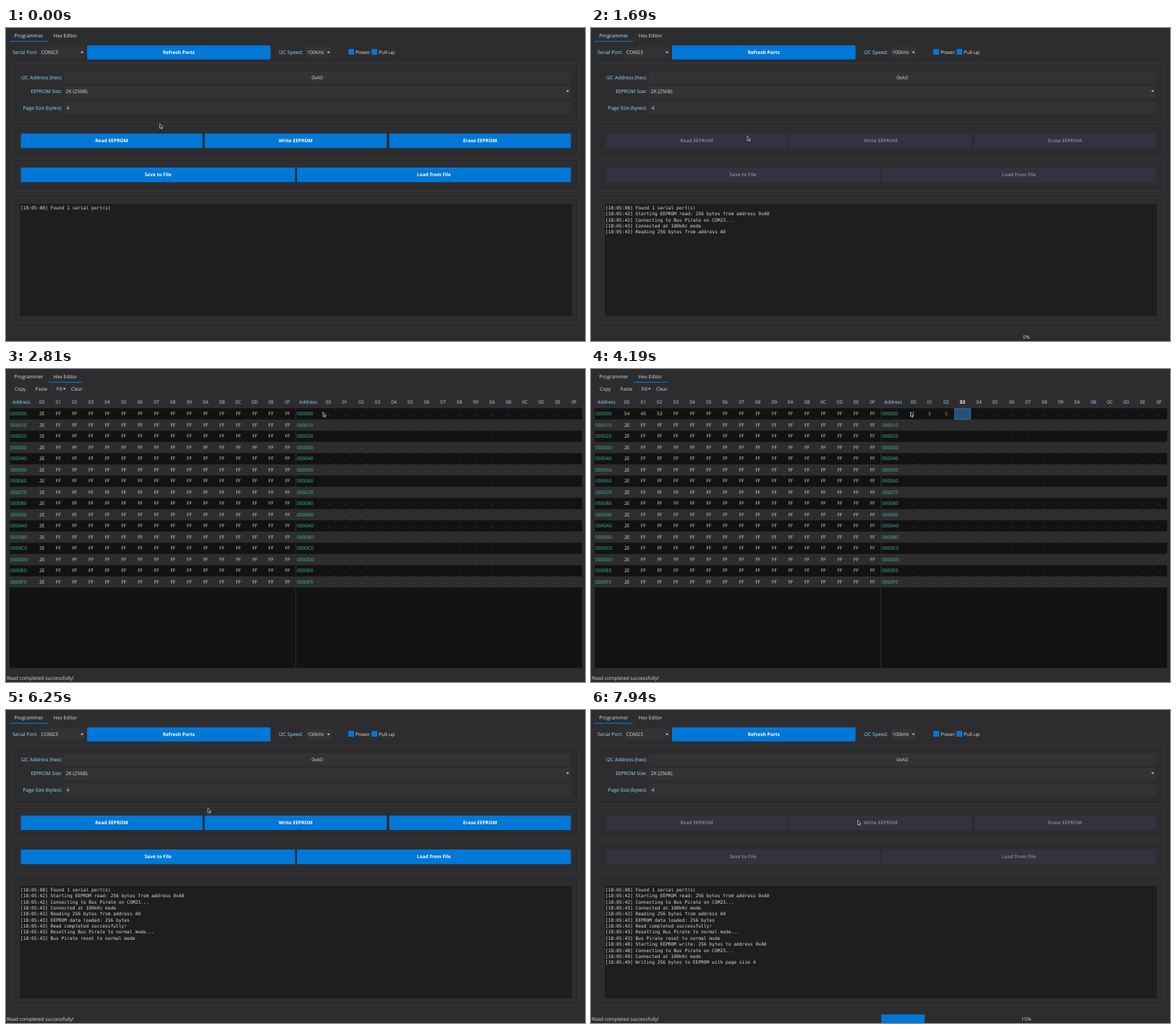
An HTML page that plays this animation: 800x433 px, repeating every 8000 ms.

```html
<!DOCTYPE html>
<html lang="en">
<head>
<meta charset="utf-8">
<title>EEPROM Programmer</title>
<style>
html, body { margin: 0; width: 100%; height: 100%; overflow: hidden; background: #2d2d30; }
svg { display: block; width: 800px; height: 433px; }
text { font: 6.8px "Open Sans", "Noto Sans", sans-serif; fill: #dcdcdc; text-rendering: geometricPrecision; white-space: pre; }
.mid { text-anchor: middle; }
.end { text-anchor: end; }
.label { fill: #9cdcfe; }
.btn text { font-size: 6.6px; font-weight: 700; fill: #fff; }
.btn rect { fill: #0078d7; }
.btn.hover rect { fill: #1080d9; }
.btn.off rect { fill: #323241; }
.btn.off text { fill: #808084; }
.log text { font: 6.27px "DejaVu Sans Mono", monospace; }
.hex text { font-size: 6.6px; }
.hex .label.on { fill: #fff; font-weight: 700; }
.hex .addr { fill: #42bd9c; }
.hex .byte { fill: #d8dcba; }
.hex .char { fill: #a29a96; }
.hex .char.edited { fill: #ce9178; }
</style>
</head>
<body>
<svg viewBox="0 0 800 433" id="stage"></svg>
<script>
const LOOP = 8000;
const T = {
  readClick: 780, connected: 1690, readDone: 1810, select: 2940,
  keys: [3810, 3970, 4130, 4380], recolor: 4880,
  tabHover: 5500, back: 5750, writeClick: 6840, writing: 7750
};
const WORD = 'TEST';

// time, x, y of the pointer tip
const POINTER = [
  [0, 212.5, 132.5], [60, 212.5, 132.5], [250, 214, 141], [480, 216, 149.5],
  [2310, 216, 149.5], [2440, 262, 132], [2600, 365, 92], [2740, 430, 63], [2810, 438, 59.5],
  [3130, 438, 59.5], [3380, 441.5, 59.5],
  [4880, 441.5, 59.5], [5030, 375, 53], [5300, 150, 24], [5480, 65, 11], [5600, 51.5, 8.5],
  [5740, 51.5, 8.5], [6000, 150, 62], [6250, 278.5, 135.5], [6480, 353, 150], [6600, 368.5, 152.5]
];

const LOG = [
  [0, '08', 'Found 1 serial port(s)'],
  [T.readClick, '42', 'Starting EEPROM read: 256 bytes from address 0xA0'],
  [T.readClick, '42', 'Connecting to Bus Pirate on COM23...'],
  [T.connected, '43', 'Connected at 100kHz mode'],
  [T.connected, '43', 'Reading 256 bytes from address A0'],
  [T.readDone, '43', 'EEPROM data loaded: 256 bytes'],
  [T.readDone, '43', 'Read completed successfully!'],
  [T.readDone, '43', 'Resetting Bus Pirate to normal mode...'],
  [T.readDone, '43', 'Bus Pirate reset to normal mode'],
  [T.writeClick, '48', 'Starting EEPROM write: 256 bytes to address 0xA0'],
  [T.writeClick, '48', 'Connecting to Bus Pirate on COM23...'],
  [T.writing, '49', 'Connected at 100kHz mode'],
  [T.writing, '49', 'Writing 256 bytes to EEPROM with page size 4']
];

const rect = (x, y, x2, y2, fill, more = '') =>
  `<rect x="${x}" y="${y}" width="${x2 - x}" height="${y2 - y}" fill="${fill}" ${more}/>`;
// y is the middle of the capitals
const text = (x, y, s, cls = '', more = '') =>
  `<text x="${x}" y="${y + 2.4}" class="${cls}" ${more}>${s}</text>`;
const frame = (y, y2) => rect(9.5, y + .5, 791.5, y2 + .5, 'none', 'stroke="#37373a" rx="2"');
const input = (x, y, x2, y2) => rect(x, y, x2, y2, '#333336', 'rx="1"');
const arrow = (x, y) => `<path d="M${x - 2} ${y - 1}h4l-2 2.2z" fill="#dcdcdc"/>`;
const button = (x, y, x2, y2, s, id = '') =>
  `<g class="btn" id="${id}">${rect(x, y, x2, y2, '', 'rx="1.5"')}${text((x + x2) / 2, y + 10, s, 'mid')}</g>`;
const hex = (n, len) => n.toString(16).toUpperCase().padStart(len, '0');

function programmerPage() {
  return frame(48, 130) + frame(134, 178) + frame(181, 225) + frame(229, 408) +
    text(9, 33.5, 'Serial Port:', 'label') + input(47, 26, 109, 41) +
    text(48.5, 33.5, 'COM23') + arrow(105, 33.8) +
    button(112, 24, 365.5, 43.5, 'Refresh Ports') +
    text(377, 33.5, 'I2C Speed:', 'label') + input(414, 26, 449, 41) +
    text(416, 33.5, '100kHz') + arrow(445.5, 33.8) +
    rect(473, 29, 481, 37, '#0078d7', 'rx="1"') + text(483, 33.5, 'Power') +
    rect(505, 29, 513, 37, '#0078d7', 'rx="1"') + text(515, 33.5, 'Pull-up') +
    text(77.5, 68.3, 'I2C Address (hex):', 'label end') + input(80, 60, 780.5, 77) +
    text(430, 68.3, '0xA0', 'mid') +
    text(77.5, 88, 'EEPROM Size:', 'label end') + input(80, 80, 780.5, 96) +
    text(82.5, 88, '2K (256B)') + arrow(776, 87.5) +
    text(77.5, 110.5, 'Page Size (bytes):', 'label end') + input(80, 102, 780.5, 119) +
    text(83.5, 110.5, '4') +
    button(20.5, 146, 271.5, 166, 'Read EEPROM', 'read') +
    button(274.5, 146, 526, 166, 'Write EEPROM', 'write') +
    button(529.5, 146, 780.5, 166, 'Erase EEPROM', 'erase') +
    button(20.5, 193, 399.5, 213.3, 'Save to File', 'save') +
    button(402, 193, 780.5, 213.3, 'Load from File', 'load') +
    rect(18.5, 242.5, 782.5, 399.5, '#1e1e1e', 'stroke="#38383b" stroke-width=".6"') +
    '<g class="log">' + LOG.map(([, sec, msg], i) =>
      text(20, 248.4 + i * 8.37, `[18:05:${sec}] ${msg}`, 'line')).join('') + '</g>';
}

function hexTable(left, first, side) {
  let s = rect(left, 38, left + 395, 413.5, '#121213') + rect(left, 38, left + 395, 54.3, '#2d2d30');
  for (let r = 1; r < 16; r += 2) s += rect(left, 54.3 + r * 15.5, left + 395, 69.8 + r * 15.5, '#2d2d30');
  if (side === 'char')
    s += '<rect id="sel" y="54.8" width="21.8" height="14.7" fill="#264f78" stroke="#3f7db5" stroke-width=".8"/>';
  s += text(left + 16.5, 45.3, 'Address', 'label mid');
  for (let c = 0; c < 16; c++)
    s += text(first + c * 22.62, 45.3, hex(c, 2), 'label mid', `id="${side}Head${c}"`);
  for (let r = 0; r < 16; r++) {
    const y = 62 + r * 15.5;
    s += text(left + 1, y, hex(r * 16, 6), 'addr');
    for (let c = 0; c < 16; c++) {
      const value = side === 'char' ? '.' : c ? 'FF' : '2E';
      s += text(first + c * 22.62, y, value, side + ' mid', `id="${side}${r * 16 + c}"`);
    }
  }
  return s;
}

function hexPage() {
  return text(12, 28, 'Copy') + text(40.5, 28, 'Paste') + text(69.5, 28, 'Fill') +
    arrow(80.8, 27.6) + text(90, 28, 'Clear') +
    hexTable(5, 49.6, 'byte') + hexTable(401, 445.5, 'char');
}

const $ = id => document.getElementById(id);
$('stage').innerHTML = rect(0, 0, 800, 433, '#2d2d30') +
  rect(5, 2, 58, 18, '#3b3b3e', 'id="tabHover"') +
  '<rect id="tabLine" y="17.8" height="1.1" fill="#0078d7"/>' +
  text(11.3, 10.3, 'Programmer') + text(65.5, 10.3, 'Hex Editor') +
  `<g id="progPage">${programmerPage()}</g><g id="hexPage" class="hex">${hexPage()}</g>` +
  text(1, 428, 'Read completed successfully!', '', 'id="status"') +
  '<g id="progress">' + rect(401, 421, 800, 433, '#2b2b2e', 'stroke="#353538" stroke-width=".6"') +
  rect(401, 421.3, 401, 433, '#0078d7', 'id="bar" rx="1"') + text(601.5, 428, '', 'mid', 'id="percent"') + '</g>' +
  '<path id="pointer" d="M0 0V6.4L1.5 5.1 2.6 7.4 3.6 6.9 2.6 4.7H4.5Z" fill="#1c1c1c" stroke="#d8d8d8" stroke-width=".7"/>';

const lines = document.querySelectorAll('.line');
const show = (el, on) => { el.style.display = on ? '' : 'none'; };

function pointerAt(t) {
  const i = POINTER.findIndex(p => p[0] > t);
  if (i < 0) return POINTER[POINTER.length - 1].slice(1);
  const [t0, x0, y0] = POINTER[i - 1], [t1, x1, y1] = POINTER[i];
  const k = (t - t0) / (t1 - t0);
  return [x0 + (x1 - x0) * k, y0 + (y1 - y0) * k];
}

function progressAt(t) {
  if (t < T.connected) return 0;
  if (t < T.readDone) return (t - T.connected) / (T.readDone - T.connected);
  if (t < T.writing) return 0;
  return Math.min(10, Math.floor((t - T.writing) / 19)) / 64;
}

function draw(t) {
  const onHex = t >= T.readDone && t < T.back;
  const busy = t >= T.readClick && t < T.readDone || t >= T.writeClick;
  const [px, py] = pointerAt(t);

  show($('progPage'), !onHex);
  show($('hexPage'), onHex);
  show($('tabHover'), onHex && t >= T.tabHover);
  $('tabLine').setAttribute('x', onHex ? 59 : 5);
  $('tabLine').setAttribute('width', onHex ? 46.5 : 53);
  show($('status'), t >= T.readDone);
  show($('progress'), busy);
  const done = Math.floor(progressAt(t) * 100);
  $('bar').setAttribute('width', done * 4);
  $('percent').textContent = done + '%';

  for (const id of ['read', 'write', 'erase', 'save', 'load']) $(id).classList.toggle('off', busy);
  const overRow = !busy && py > 146 && py < 166;
  $('read').classList.toggle('hover', overRow && px < 271);
  $('write').classList.toggle('hover', overRow && px > 275);
  lines.forEach((el, i) => show(el, t >= LOG[i][0]));

  const typed = T.keys.filter(k => t >= k).length;
  const selected = t >= T.select ? typed : -1;
  show($('sel'), selected >= 0);
  $('sel').setAttribute('x', 434.6 + Math.max(0, selected) * 22.62);
  for (let c = 0; c <= WORD.length; c++) $('charHead' + c).classList.toggle('on', c === selected);
  for (let c = 0; c < WORD.length; c++) {
    const set = c < typed;
    $('char' + c).textContent = set ? WORD[c] : '.';
    $('char' + c).classList.toggle('edited', set && t >= T.recolor);
    $('byte' + c).textContent = set ? hex(WORD.charCodeAt(c), 2) : c ? 'FF' : '2E';
  }

  $('pointer').setAttribute('transform', `translate(${px} ${py})`);
}

function tick() {
  draw(performance.now() % LOOP);
  requestAnimationFrame(tick);
}
tick();
</script>
</body>
</html>
```
